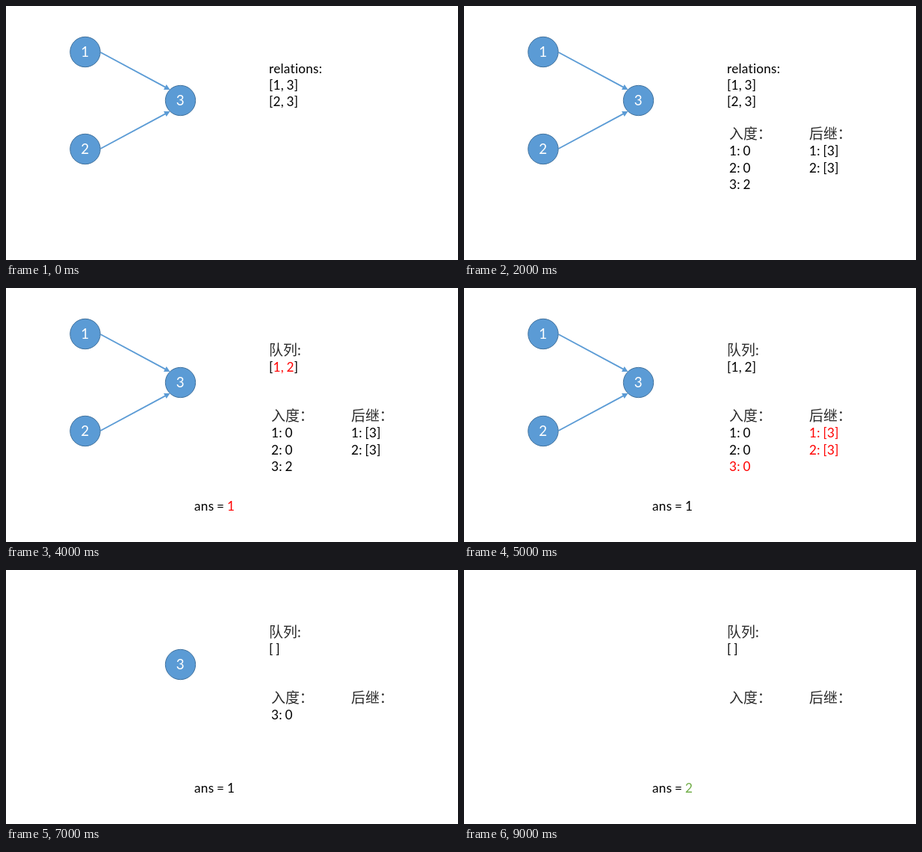
These frames come from a looping animation (605x340 px, 10 s). An HTML page:

```html
<!DOCTYPE html>
<html lang="zh">
<head>
<meta charset="utf-8">
<style>
  html, body { margin: 0; width: 100%; height: 100%; overflow: hidden; background: #fff; }
  svg { display: block; width: 605px; height: 340px; }
  text {
    font: 17.2px Lato, "Noto Sans CJK SC", "Noto Sans CJK", sans-serif;
    font-variant-ligatures: none;
    letter-spacing: .25px;
    word-spacing: -.95px;
    white-space: pre;
  }
  .han { font: 300 18.9px "Noto Sans CJK SC", "Noto Sans CJK", sans-serif; letter-spacing: 0; fill: #2b2b2b; }
  .node circle { fill: #5b9bd5; stroke: #41719c; }
  .node text { font-size: 18.8px; letter-spacing: 0; fill: #fff; text-anchor: middle; }
  .arrow { fill: #5b9bd5; stroke: none; }
  .arrow line { stroke: #5b9bd5; stroke-width: 1.8; }
  .red { fill: #f00; }
  .green { fill: #70ad47; }
</style>
</head>
<body>
<svg id="stage" viewBox="0 0 605 340"></svg>
<script>
const STEPS = 10, STEP_MS = 1000;
const stage = document.getElementById('stage');

// Shows a piece of markup from step `from` up to, not including, step `to`.
function show(from, to, markup) {
  const group = document.createElementNS('http://www.w3.org/2000/svg', 'g');
  group.innerHTML = markup;
  stage.append(group);
  if (from === 0 && to === STEPS) return;
  const frames = Array.from({ length: STEPS + 1 }, (_, i) => ({
    offset: i / STEPS,
    opacity: i >= from && i < to ? 1 : 0,
    easing: 'step-end'
  }));
  group.animate(frames, { duration: STEPS * STEP_MS, iterations: Infinity });
}

const text = (x, y, content, style = '') => `<text x="${x}" y="${y}" class="${style}">${content}</text>`;
const tint = (style, content) => `<tspan class="${style}">${content}</tspan>`;
const node = (x, y, label) =>
  `<g class="node"><circle cx="${x}" cy="${y}" r="20.2"/>${text(x - .2, y + 6.4, label)}</g>`;

function arrow(x1, y1, x2, y2) {
  const length = Math.hypot(x2 - x1, y2 - y1);
  const angle = Math.atan2(y2 - y1, x2 - x1) * 180 / Math.PI;
  return `<g class="arrow" transform="translate(${x1} ${y1}) rotate(${angle})">
    <line x2="${length - 5}"/><path d="M${length} 0l-7.5 -4v8z"/></g>`;
}

const queue = content => text(352, 112, content);
const degree = (row, content, style) => text(355, 200.3 + row * 22.4, content, style);
const next = (row, content, style) => text(462, 200.3 + row * 22.4, content, style);
const answer = content => text(252, 298.3, 'ans = ' + content);

// Graph
show(0, 6, arrow(126.5, 62, 219.5, 112) + arrow(126.5, 191, 219.5, 141)
  + node(106, 61.5, 1) + node(106, 191.5, 2));
show(0, 9, node(233.5, 126.5, 3));

// Relations, then the queue
show(0, 3, text(352, 89.5, 'relations:') + queue('[1, 3]') + text(352, 134.4, '[2, 3]'));
show(3, 10, text(352, 90, '队列:', 'han'));
show(3, 4, queue('[ ]'));
show(4, 5, queue(`[${tint('red', '1, 2')}]`));
show(5, 7, queue('[1, 2]'));
show(7, 8, queue('[ ]'));
show(8, 9, queue('[3]'));
show(9, 10, queue('[ ]'));

// In-degrees
show(1, 10, text(355, 178, '入度：', 'han'));
show(1, 6, degree(0, '1: 0') + degree(1, '2: 0'));
show(1, 5, degree(2, '3: 2'));
show(5, 6, degree(2, '3: 0', 'red'));
show(6, 9, degree(0, '3: 0'));

// Successors
show(2, 10, text(462, 178, '后继：', 'han'));
show(2, 5, next(0, '1: [3]') + next(1, '2: [3]'));
show(5, 6, next(0, '1: [3]', 'red') + next(1, '2: [3]', 'red'));

// Answer
show(3, 4, answer('0'));
show(4, 5, answer(tint('red', '1')));
show(5, 8, answer('1'));
show(8, 9, answer(tint('red', '2')));
show(9, 10, answer(tint('green', '2')));
</script>
</body>
</html>
```
